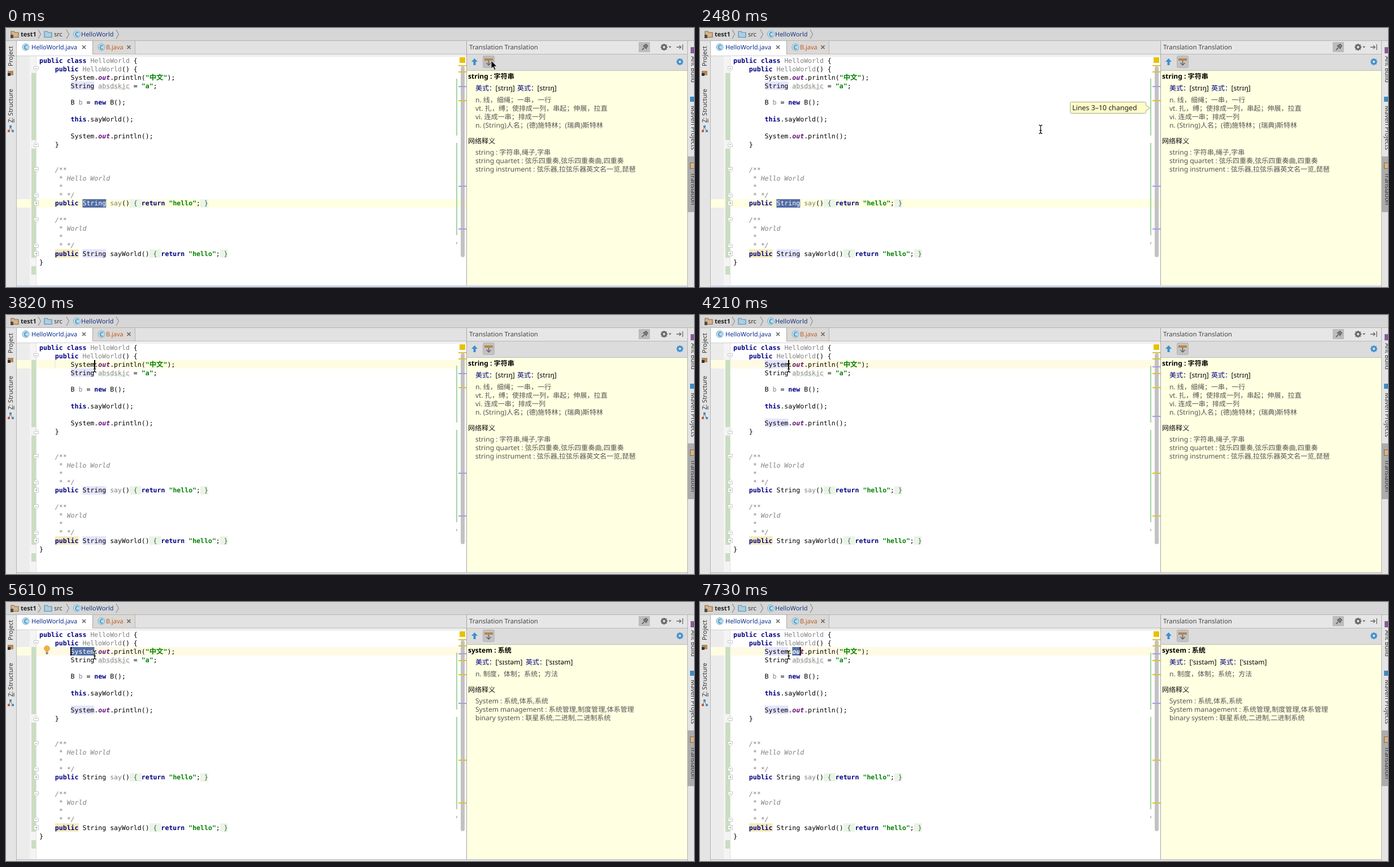
These frames come from a looping animation (1218 px wide and 460 px high, 8000 ms). An HTML page:

```html
<!DOCTYPE html>
<html lang="zh-CN">
<head>
<meta charset="utf-8">
<title>Editor with translation panel</title>
<style>
html, body { margin: 0; width: 100%; height: 100%; overflow: hidden; background: #d6d6d6; }
svg { display: block; width: 1218px; height: 460px; }
text { white-space: pre; text-rendering: geometricPrecision; }
.ui { font: 11px 'Noto Sans', 'Noto Sans CJK SC', sans-serif; fill: #333; }
.doc { font: 12.05px 'Noto Sans', 'Noto Sans CJK SC', sans-serif; fill: #555; }
.doc .h { font-weight: 700; fill: #000; }
.doc .m { font-weight: 500; fill: #111; }
.doc .v { fill: #000080; }
.doc .i { fill: #000; }
.code { font: 11.55px 'DejaVu Sans Mono', 'Noto Sans CJK SC', monospace; fill: #000; }
.k { font-weight: 700; fill: #000080; }
.s { font-weight: 700; fill: #008000; }
.z { font-weight: 700; fill: #008000; font-size: 12.45px; }
.f { font-weight: 700; font-style: italic; fill: #660e7a; }
.u { fill: #808080; }
.c { font-style: italic; fill: #808080; }
.b { fill: #4c5a4c; }
.w { fill: #fff; }
.out { font-weight: 700; font-style: italic; }

/* Percentages are ms / 80 of the 8 s loop. */
.anim { animation: 8s step-end infinite; }
.press { animation-name: press; }
.arrow { animation-name: arrow; }
.beam { animation-name: beam; }
.cursor { animation-name: cursor; }
.tip { animation-name: tip; }
.blur { animation-name: blur; }
.focus { animation-name: focus; }
.useA { animation-name: useA; }
.useB { animation-name: useB; }
.selB { animation-name: selB; }
.bulb { animation-name: bulb; }
.docA { animation-name: docA; }
.docB { animation-name: docB; }
.selO { animation-name: selO; }
.selU { animation-name: selU; }
.caret { animation-name: caret; }
@keyframes press { 0% { opacity: 1 } 5.875%, 100% { opacity: 0 } }
@keyframes arrow { 0% { opacity: 1 } 27.25%, 100% { opacity: 0 } }
@keyframes beam { 0% { opacity: 0 } 27.25%, 100% { opacity: 1 } }
@keyframes tip { 0% { opacity: 0 } 29.125% { opacity: 1 } 32.875%, 100% { opacity: 0 } }
@keyframes blur { 0% { opacity: 1 } 47.75%, 100% { opacity: 0 } }
@keyframes focus { 0% { opacity: 0 } 47.75%, 100% { opacity: 1 } }
@keyframes useA { 0% { opacity: 1 } 52.625%, 100% { opacity: 0 } }
@keyframes useB { 0% { opacity: 0 } 52.625%, 100% { opacity: 1 } }
@keyframes selB { 0% { opacity: 0 } 58.875% { opacity: 1 } 83.625%, 100% { opacity: 0 } }
@keyframes bulb { 0% { opacity: 0 } 68.25% { opacity: 1 } 83.625%, 100% { opacity: 0 } }
@keyframes docA { 0% { opacity: 1 } 70.125%, 100% { opacity: 0 } }
@keyframes docB { 0% { opacity: 0 } 70.125%, 100% { opacity: 1 } }
@keyframes selO { 0% { opacity: 0 } 94.75%, 100% { opacity: 1 } }
@keyframes selU { 0% { opacity: 0 } 96.625%, 100% { opacity: 1 } }
@keyframes caret {
  0% { opacity: 0; transform: translateX(156px) }
  47.75% { opacity: 1; transform: translateX(156px) }
  58.875% { opacity: 1; transform: translateX(114px) }
  72.375% { opacity: 0; transform: translateX(114px) }
  78% { opacity: 1; transform: translateX(114px) }
  83.625% { opacity: 1; transform: translateX(156px) }
  89.125% { opacity: 1; transform: translateX(162.6px) }
  94.75% { opacity: 1; transform: translateX(169.6px) }
  96.625%, 100% { opacity: 1; transform: translateX(176.6px) }
}
@keyframes cursor {
  0% { transform: translate(859px, 58px) }
  23.625% { transform: translate(858px, 60px) }
  25.375% { transform: translate(868px, 131px) }
  27.25% { transform: translate(681px, 177px) }
  29.125% { transform: translate(623px, 177px) }
  31% { transform: translate(603px, 180px) }
  32.875% { transform: translate(266px, 224px) }
  34.75% { transform: translate(266px, 214px) }
  36.625% { transform: translate(194px, 119px) }
  38.375% { transform: translate(190px, 113px) }
  40.25% { transform: translate(159px, 95px) }
  42.125%, 100% { transform: translate(157px, 94px) }
}
</style>
</head>
<body>
<svg id="stage" viewBox="0 0 1218 460" xmlns="http://www.w3.org/2000/svg"></svg>
<script>
const stage = document.getElementById('stage');
const CH = 6.953, X0 = 59, LH = 14.92, Y0 = 50;
const colX = c => X0 + c * CH;
const lineY = n => Y0 + n * LH;

function add(tag, attrs, parent = stage) {
  const el = document.createElementNS('http://www.w3.org/2000/svg', tag);
  for (const k in attrs) el.setAttribute(k, attrs[k]);
  parent.appendChild(el);
  return el;
}
const rect = (x, y, width, height, fill, parent) => add('rect', { x, y, width, height, fill }, parent);
const path = (d, stroke, fill = 'none', parent, w = 1) =>
  add('path', { d, stroke, fill, 'stroke-width': w }, parent);
const anim = (name, parent) => add('g', { class: 'anim ' + name }, parent);
const label = (x, y, str, attrs = {}, parent) => {
  const el = add('text', { x, y, class: 'ui', ...attrs }, parent);
  el.textContent = str;
  return el;
};
// Spans are written as style|text|style|text
function rich(x, y, cls, spec, parent) {
  const el = add('text', { x, y, class: cls }, parent), parts = spec.split('|');
  for (let i = 0; i < parts.length; i += 2)
    add('tspan', { class: parts[i] }, el).textContent = parts[i + 1];
}
const cells = (n, c, len, fill, parent) =>
  rect(colX(c), Math.round(lineY(n)), len * CH, 15, fill, parent);

function gear(x, y, fill) {
  for (let a = 0; a < 180; a += 45)
    add('rect', { x: x - 1.4, y: y - 6, width: 2.8, height: 12, fill, transform: `rotate(${a} ${x} ${y})` });
  add('circle', { cx: x, cy: y, r: 3.4, fill: '#dcdcdc', stroke: fill, 'stroke-width': 2.4 });
}
function classIcon(x, y) {
  add('circle', { cx: x, cy: y, r: 6.2, fill: '#b3dcf0', stroke: '#6fa9c9', 'stroke-width': .8 });
  label(x, y + 3.9, 'C', { 'text-anchor': 'middle', style: 'font-size:10.5px;fill:#245a7c' });
}
function folder(x, y, fill, edge) {
  path(`M${x} ${y}h5l1.5 2h6.5v8.5h-13z`, edge, fill, stage, 1.2);
}
const chevron = x => path(`M${x} 3l4.5 8l-4.5 8`, '#8a8a8a', 'none', stage, 1.1);
const cross = x => path(`M${x - 3} 31l6 6m0 -6l-6 6`, '#666', 'none', stage, 1.7);

function frameParts() {
  rect(0, 0, 1218, 460, '#d6d6d6');
  rect(0, 22, 1218, 1, '#b4b4b4');
  folder(9, 6, '#d9b48a', '#8b6b4a');
  rect(8, 12, 5, 6, '#4b4b4b');
  label(26, 15, 'test1', { style: 'font-weight:700;fill:#222' });
  chevron(57);
  folder(68, 6, '#a9cfe6', '#5d8dab');
  label(85, 15, 'src');
  chevron(107);
  classIcon(125.5, 11);
  label(133, 15, 'HelloWorld', { style: 'fill:#17387f' });
  chevron(195);

  // Left tool strip
  rect(0, 23, 18, 437, '#e4e4e4');
  rect(18, 23, 1, 437, '#b4b4b4');
  label(0, 0, 'Project', { transform: 'translate(12 68) rotate(-90)' });
  rect(3, 76, 10, 8, '#b48a5a');
  rect(3, 80, 5, 5, '#333');
  label(0, 0, 'Z: Structure', { transform: 'translate(12 168) rotate(-90)' });
  rect(13.5, 161.5, 1, 6.5, '#333');
  path('M8 176l-3 6m3 -6l3 6', '#777');
  rect(6, 173, 4, 4, '#4f8fc0');
  rect(3, 181, 4, 4, '#c75a3a');
  rect(10, 181, 4, 4, '#4f8fc0');

  // Tabs
  rect(19, 23, 796, 24, '#e2e2e2');
  rect(154, 23, 74, 23, '#dcd8d5');
  rect(228, 23, 1, 23, '#b6b6b6');
  rect(19, 46, 796, 1, '#b0b0b0');
  rect(19, 23, 134, 24, '#fff');
  rect(153, 23, 1, 23, '#a8a8a8');
  rect(19, 47, 796, 3, '#fff');
  rect(19, 49, 796, 1, '#d0d0d0');
  classIcon(35, 34);
  label(45, 38, 'HelloWorld.java', { style: 'fill:#0a2f8c' });
  cross(138);
  classIcon(169, 34);
  label(177, 38, 'B.java', { style: 'fill:#b8602c' });
  cross(217.5);
}

const CODE = [
  [0, 0, 'k|public class |u|HelloWorld|p| {'],
  [1, 4, 'k|public |u|HelloWorld|p|() {'],
  [2, 8, 'p|System.|f|out|p|.println(|s|"|z|中文|s|"|p|);'],
  [3, 8, 'p|String |u|absdskjc|p| = |s|"a"|p|;'],
  [5, 8, 'p|B |u|b|p| = |k|new |p|B();'],
  [7, 8, 'k|this|p|.sayWorld();'],
  [9, 8, 'p|System.|f|out|p|.println();'],
  [10, 4, 'p|}'],
  [13, 4, 'c|/**'],
  [14, 5, 'c|* Hello World'],
  [15, 5, 'c|*'],
  [16, 5, 'c|* */'],
  [17, 4, 'k|public |p|String |u|say|p|() |b|{ |k|return |s|"hello"|p|;|b| }'],
  [19, 4, 'c|/**'],
  [20, 5, 'c|* World'],
  [21, 5, 'c|*'],
  [22, 5, 'c|* */'],
  [23, 4, 'k|public |p|String sayWorld() |b|{ |k|return |s|"hello"|p|;|b| }'],
  [24, 0, 'p|}'],
];

function fold(n, kind) {
  const y = lineY(n) + 7.5, x = 53.5;
  const d = kind === '+' ? `M${x - 4} ${y - 4}h8v8h-8z`
    : kind === 'v' ? `M${x - 4} ${y - 4}h8v4.5l-4 4l-4 -4z`
    : `M${x - 4} ${y + 4}h8v-4.5l-4 -4l-4 4z`;
  path(d, '#c6c6c6', '#fff');
  path(`M${x - 2} ${y}h4` + (kind === '+' ? `M${x} ${y - 2}v4` : ''), '#a4a4a4');
}

function editor() {
  rect(19, 50, 796, 407, '#fff');
  rect(19, 50, 23, 407, '#ececec');
  rect(42, 50, 11, 407, '#f4f4f4');
  const before = anim('blur'), after = anim('focus');
  rect(19, 304, 796, 15, '#ffffe1', before);
  rect(19, 80, 796, 15, '#fffde1', after);
  rect(53, 80, 762, 15, '#fffae3', anim('useB'));
  rect(86.5, 80, 1, 15, '#e4e2cf', after);
  for (const [a, b] of [[2, 10], [11, 24], [25, 26]])
    rect(45, lineY(a), 8, (b - a) * LH, '#c9dec1');
  rect(53, 50, 1, 407, '#e2e2e2');
  [[1, 'v'], [10, '^'], [13, 'v'], [16, '^'], [17, '+'], [19, 'v'], [22, '^'], [23, '+']]
    .forEach(f => fold(...f));

  for (const [n, c] of [[17, 23], [23, 28]]) {
    cells(n, c, 3, '#e9f5e6');
    cells(n, c + 18, 2, '#e9f5e6');
  }
  cells(23, 4, 6, '#f6ebbc');
  const useA = anim('useA'), useB = anim('useB');
  for (const [n, c] of [[3, 8], [17, 11], [23, 11]]) cells(n, c, 6, '#e4e4ff', useA);
  for (const n of [2, 9]) cells(n, 8, 6, '#e4e4ff', useB);

  for (const [n, c, spec] of CODE) rich(colX(c), lineY(n) + 11.8, 'code', spec);
  let wave = `M${colX(15)} 108.5`;
  for (let i = 0; i < 14; i++) wave += `l2 ${i % 2 ? 1.6 : -1.6}l2 0`;
  path(wave, '#a9c9a0', 'none', stage, .9);

  const select = (cls, n, c, str, style = 'w') => {
    const g = anim(cls);
    cells(n, c, str.length, '#526da5', g);
    rich(colX(c), lineY(n) + 11.8, 'code', style + '|' + str, g);
  };
  select('blur', 17, 11, 'String');
  select('selB', 2, 8, 'System');
  select('selO', 2, 15, 'o', 'w out');
  select('selU', 2, 16, 'u', 'w out');
  rect(0, 80, 2, 15, '#000', anim('caret'));

  const bulb = anim('bulb');
  add('circle', { cx: 72.5, cy: 82.5, r: 4.8, fill: '#f5b042', stroke: '#d98e2b', 'stroke-width': .8 }, bulb);
  rect(70.5, 87, 4, 2, '#e0a040', bulb);
  rect(70.5, 89.5, 4, 3, '#777', bulb);

  // Change and error stripe
  for (const [y, h] of [[90, 101], [204, 164], [380, 4]]) rect(797, y, 2, h, '#a3d6a3');
  add('rect', { x: 805, y: 68, width: 7, height: 339, rx: 3.5, fill: '#c2c2c2' });
  rect(803, 52, 10, 10, '#e6c200');
  const marksA = anim('useA'), marksB = anim('useB');
  const mark = (y, fill, parent) => rect(801, y - 1, 14, 2, fill, parent);
  const gold = '#e2c02c', violet = '#a79be8';
  [67, 78, 129].forEach(y => mark(y, gold));
  [104, 281, 357].forEach(y => { mark(y, violet, marksA); mark(y, gold, marksB); });
  [92, 180].forEach(y => mark(y, violet, marksB));
}

function panelText(cls, d) {
  const g = anim(cls), row = (x, y, spec) => rich(x, y + 4.3, 'doc', spec, g);
  row(818, 85.5, 'h|' + d.title);
  row(831, 106.5, 'v|美式：');
  row(866.5, 106.5, 'i|' + d.sound);
  row(d.x, 106.5, 'v|英式：');
  row(d.x + 35.5, 106.5, 'i|' + d.sound);
  d.defs.forEach((s, i) => row(831, 127.5 + i * 15, 'p|' + s));
  const y = 127.5 + (d.defs.length - 1) * 15 + 27.8;
  row(818, y, 'm|网络释义');
  d.web.forEach((s, i) => row(831, y + 20.8 + i * 15, 'p|' + s));
}

function panel() {
  rect(815, 23, 1, 437, '#a6a6a6');
  rect(816, 23, 390, 23, '#e6e6e6');
  rect(816, 46, 390, 1, '#b8b8b8');
  label(820, 38, 'Translation Translation', { style: 'font-size:11.4px;fill:#444' });
  rect(1120, 25, 20, 18, '#bcbcbc');
  path('M1126 39l4 -4m-2 -4l6 6m-4 -7l5 5m-4 -4l2 -2l3 3l-2 2', '#555', 'none', stage, 1.6);
  gear(1165, 34, '#666');
  path('M1173 32.5h5l-2.5 3z', 'none', '#666');
  path('M1187 34h8m-3 -3l3 3l-3 3M1198 29v10', '#666', 'none', stage, 1.3);

  rect(816, 47, 390, 28, '#dcdcdc');
  rect(816, 75, 390, 1, '#bebebe');
  path('M829.5 54l5.5 6h-3.5v6h-4v-6h-3.5z', 'none', '#3a8fd0');
  const button = (fill, parent) =>
    add('rect', { x: 844.5, y: 49.5, width: 20, height: 21, rx: 2, fill, stroke: '#b4b4b4' }, parent);
  button('#c2c2c2');
  button('#bcbcbc', anim('press'));
  rect(847, 54, 15, 4, '#b8864a');
  path('M854.5 58v8m-4 -4l4 4l4 -4', '#666', 'none', stage, 1.5);
  gear(1193, 60, '#3a8fd0');
  rect(816, 76, 390, 381, '#ffffe1');
  panelText('docA', {
    title: 'string : 字符串', sound: '[strɪŋ]', x: 905,
    defs: ['n. 线，细绳；一串，一行', 'vt. 扎，缚；使排成一列，串起；伸展，拉直',
      'vi. 连成一串；排成一列', 'n. (String)人名；(德)施特林；(瑞典)斯特林'],
    web: ['string : 字符串,绳子,字串', 'string quartet : 弦乐四重奏,弦乐四重奏曲,四重奏',
      'string instrument : 弦乐器,拉弦乐器英文名一览,琵琶'],
  });
  panelText('docB', {
    title: 'system : 系统', sound: "['sɪstəm]", x: 920,
    defs: ['n. 制度，体制；系统；方法'],
    web: ['System : 系统,体系,系统', 'System management : 系统管理,制度管理,体系管理',
      'binary system : 联星系统,二进制,二进制系统'],
  });

  // Right tool strip
  rect(1207, 23, 11, 437, '#e4e4e4');
  rect(1206, 23, 1, 437, '#b4b4b4');
  rect(1207, 228, 11, 99, '#acacac');
  const side = (y, str) => label(0, 0, str, { transform: `translate(1212.5 ${y}) rotate(90)` });
  rect(1212, 34, 6, 11, '#8a5a9c');
  side(50, 'Ant Build');
  rect(1211, 122, 7, 9, '#3f8cc4');
  side(138, 'Maven Projects');
  path('M1211.5 239.5h7v10h-7z', '#8b6b4a', '#d9b48a', stage, 1.2);
  side(257, 'Translation');
}

function overlays() {
  rect(19, 457, 1187, 1, '#b4b4b4');
  rect(19, 458, 1187, 2, '#e2e2e2');
  rect(19, 457, 1187, 3, '#d3daea', anim('blur'));

  const tip = anim('tip');
  path('M657.5 131.5h130q2 0 2 2v4l7 4.5l-7 4.5v3q0 2 -2 2h-130q-2 0 -2 -2v-16q0 -2 2 -2z', '#a8a886', '#fefcc8', tip);
  label(659, 146.3, 'Lines 3–10 changed', { style: 'font-size:12.4px;fill:#222' }, tip);

  const cursor = anim('cursor');
  path('M0 0v14l3.3 -3l2.4 5.5l2.3 -1l-2.4 -5.3h4.4z', '#fff', '#000', anim('arrow', cursor), .8);
  path('M-3 -7.5q3 0 3 2.5v10q0 2.5 -3 2.5M3 -7.5q-3 0 -3 2.5v10q0 2.5 3 2.5M-1.8 2h3.6',
    '#111', 'none', anim('beam', cursor), 1.3);
}

frameParts();
editor();
panel();
overlays();
</script>
</body>
</html>
```
